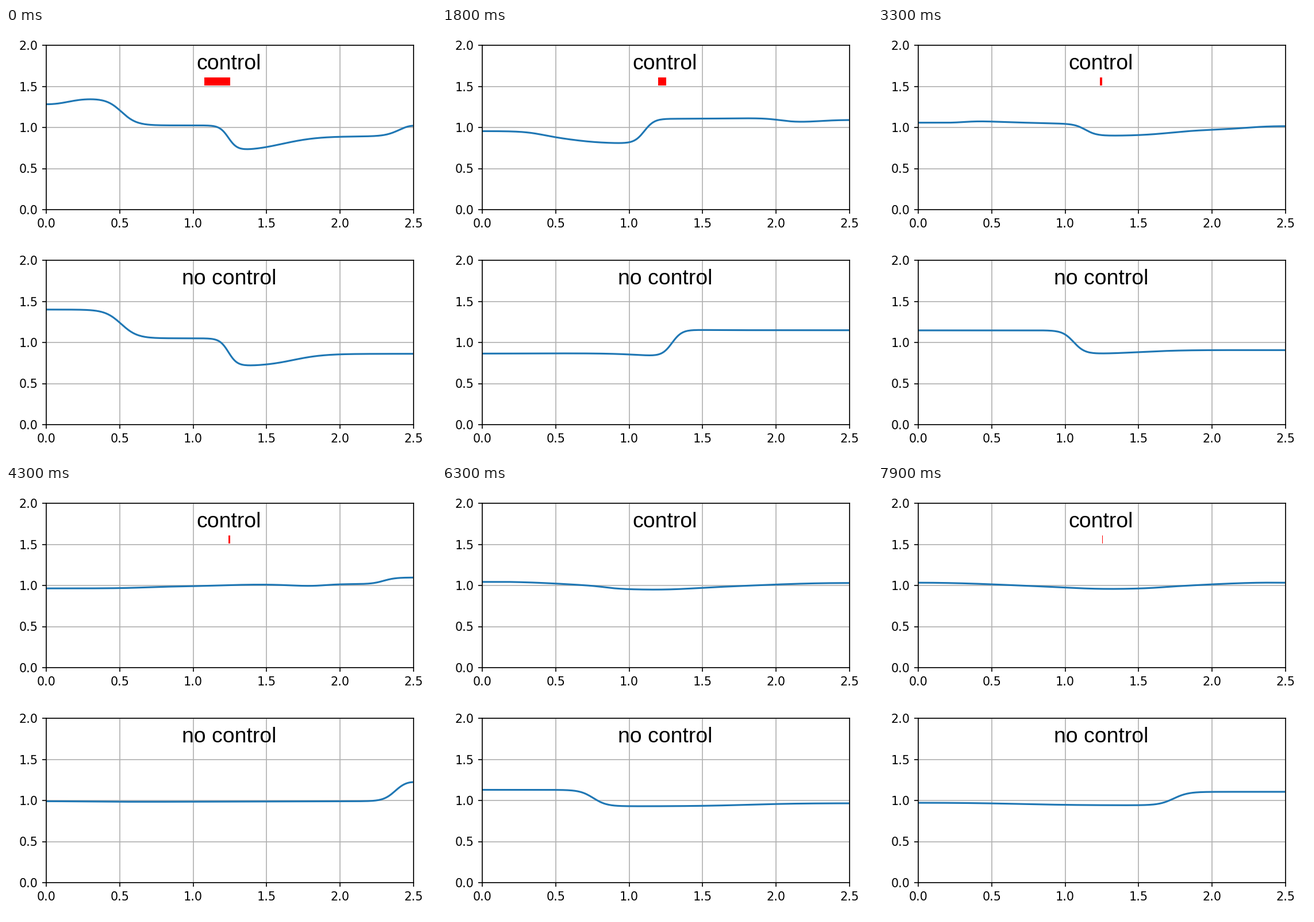
A matplotlib script for the animation above (8 s loop, 748 by 748 pixels).

```python
import numpy as np
import matplotlib.pyplot as plt
from matplotlib.animation import FuncAnimation
from matplotlib.patches import Rectangle

SIZE = 748
FRAMES, STEP = 80, 100
LENGTH = 2.5                      # tank length
LOOP = 2 * LENGTH                 # a wave's way there and back
SPEED = np.sqrt(9.81) / 2         # shallow water of depth 1 at half speed
x = np.arange(0, LENGTH, 0.01)

# Waves live on the unfolded tank: s > 0 runs right at x = s, s < 0 runs left at x = -s.
# Each is (start, drop, lifetime, width, widening per second).
FREE = [
    (-0.51, -0.35, 20, 0.11, 1.5),      # rarefaction of the broken dam
    (1.68, -0.076, 20, 0.20, 1.5),
    (-1.68, 0.076, 10, 0.22, 0.025),
]
CONTROLLED = [
    (-0.51, -0.28, 20, 0.10, 1.5),
    (-0.53, -0.05, 6, 0.12, 0.03),
    (1.55, -0.10, 5, 0.20, 0.0),
    (-1.70, 0.077, 1, 0.21, 0.0),
    (0.15, -0.085, 6, 0.12, 0.0),       # pushed off the left wall
    (-2.41, 0.18, 2, 0.10, 0.02),       # piled up at the right wall
]


def saw(s, drop, width):
    """Periodic sawtooth: a smooth front and a linear way back up."""
    s = np.mod(s + LENGTH, LOOP) - LENGTH
    return drop * (s / LOOP - np.tanh(s / width) / np.tanh(LENGTH / width) / 2)


def wave(t, start, drop, width):
    """A travelling front together with its mirror image in the walls."""
    s = start + SPEED * t
    return saw(x - s, drop, width) + saw(-x - s, drop, width)


def bore(t, drop, life, settle, span):
    """The main front: slow at first, and fading after two seconds."""
    start = settle + (1.24 - settle) * max(0, 1 - t / span)
    fade = np.exp(-max(0, t - 2) / life)
    return wave(t, start, drop * fade, 0.06 + 0.005 * t)


def ripples(t, waves):
    return sum(wave(t, start, drop * np.exp(-t / life), width + widen * t)
               for start, drop, life, width, widen in waves)


def swing(t):
    """Beat of the symmetric standing wave that control cannot damp."""
    return np.cos(2 * np.pi * SPEED / LENGTH * (t - 6.3))


def free_height(t):
    return 1 + bore(t, 0.34, 8.1, 0.89, 1.8) + ripples(t, FREE)


def controlled_height(t):
    standing = 0.03 * np.tanh(t / 3) * swing(t) * np.cos(2 * np.pi * x / LENGTH)
    return 1 + bore(t, 0.31, 1.7, 0.97, 3.0) + ripples(t, CONTROLLED) + standing


def force(t):
    return 0.006 * swing(t) - 0.178 * np.exp(-t / 1.5)


plt.rcParams.update({"font.family": "DejaVu Sans", "font.size": 10})
fig = plt.figure(figsize=(5, 5), dpi=SIZE / 5, facecolor="white")


def panel(top, label):
    ax = fig.add_axes([70 / SIZE, 1 - (top + 286) / SIZE, 639 / SIZE, 286 / SIZE])
    ax.set(xlim=(0, LENGTH), ylim=(0, 2),
           xticks=np.arange(0, 2.6, 0.5), yticks=np.arange(0, 2.1, 0.5))
    ax.grid(True)
    fig.text(388 / SIZE, 1 - (top + 42) / SIZE, label, family="Liberation Sans",
             size=18, ha="center", va="baseline")
    line, = ax.plot(x, np.ones_like(x), color="#1f77b4", lw=1.5)
    return ax, line


ax, controlled_line = panel(30, "control")
_, free_line = panel(404, "no control")
bar = ax.add_patch(Rectangle((1.25, 1.507), 0, 0.098, fc="red", lw=0, zorder=3))


def draw(i):
    t = i * STEP / 1000
    controlled_line.set_ydata(controlled_height(t))
    free_line.set_ydata(free_height(t))
    bar.set_width(force(t))
    return controlled_line, free_line, bar


anim = FuncAnimation(fig, draw, frames=FRAMES, interval=STEP, repeat=True,
                     repeat_delay=0, blit=False)
plt.show()
```
